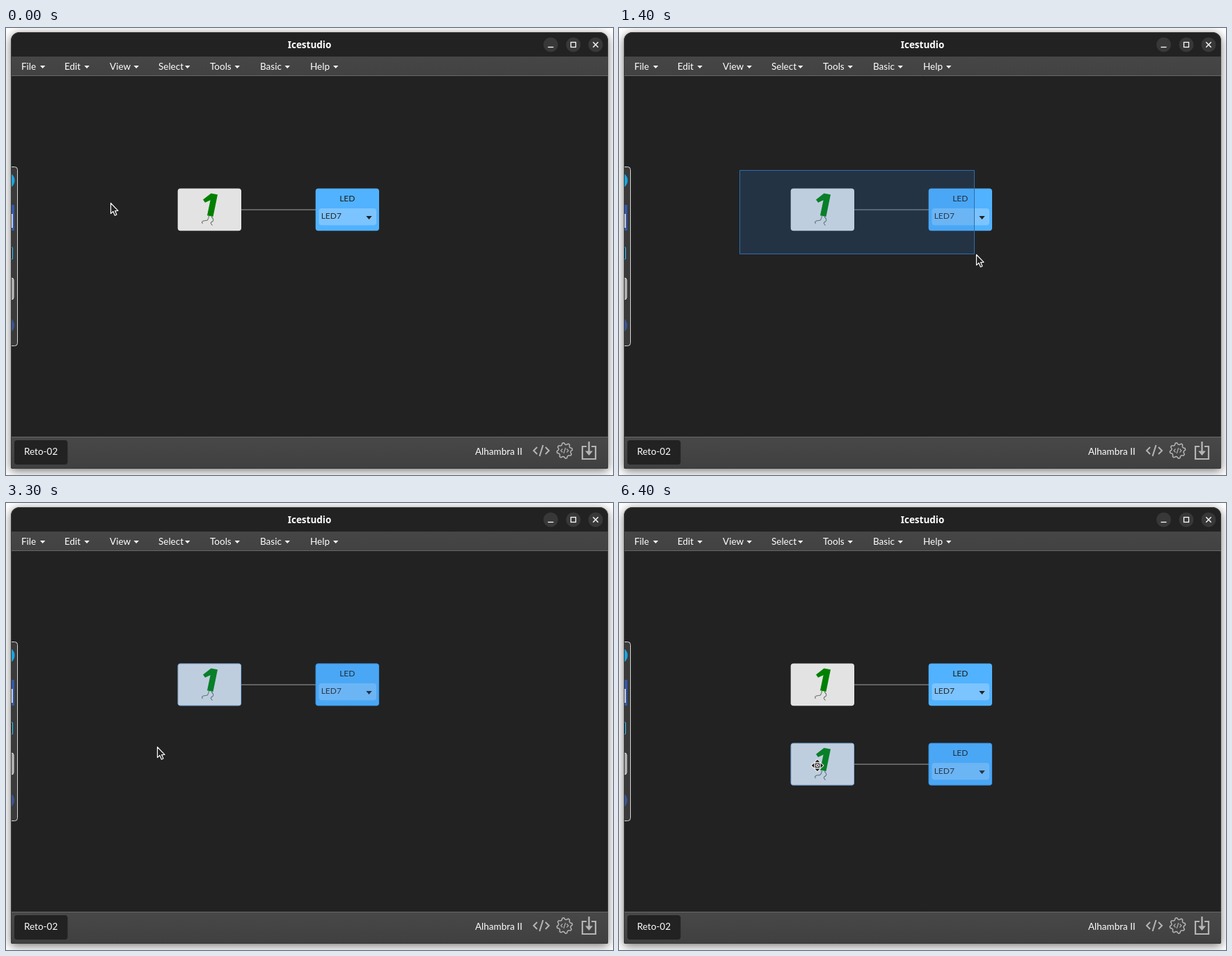
Animation of 872 by 642 pixels, one loop 8 s. Source, as an HTML page with a canvas:

```html
<!DOCTYPE html>
<html lang="en">
<head>
<meta charset="utf-8">
<title>Icestudio</title>
<style>
html, body { margin: 0; width: 100%; height: 100%; overflow: hidden; background: #fff; }
canvas { display: block; }
</style>
</head>
<body>
<canvas id="stage" width="872" height="642"></canvas>
<script>
const ctx = document.getElementById('stage').getContext('2d');
const LOOP = 8000, STEP = 100, GRID = 7.62;
const TINT = 'rgba(48,123,203,.2)';

const easeOut = p => 1 - Math.pow(1 - p, 1.4);
const smooth = p => p * p * (3 - 2 * p);
const linear = p => p;

// Pointer legs: first step, last step, destination, easing
const legs = [
  [100, 400, 173, 203, smooth],
  [600, 1400, 513, 325, easeOut],
  [1500, 1800, 565, 336, easeOut],
  [2200, 2200, 514, 341, linear],
  [2300, 2400, 396, 314, linear],
  [2600, 3300, 217, 350, smooth],
  [5200, 5200, 224, 355, linear],
  [5300, 5500, 254, 384, smooth],
  [5600, 5900, 285, 384, linear],
  [6100, 6100, 290, 383, linear],
  [6300, 6400, 285, 377, linear]
];

function pointerAt(t) {
  let x = 150, y = 251;
  for (const [first, last, tx, ty, ease] of legs) {
    const start = first - STEP;
    if (t <= start) break;
    const k = ease(Math.min(1, (t - start) / (last - start)));
    x += (tx - x) * k;
    y += (ty - y) * k;
  }
  return [x, y];
}

function box(x, y, w, h, r, fill, stroke) {
  ctx.beginPath();
  ctx.roundRect(x, y, w, h, r);
  if (fill) { ctx.fillStyle = fill; ctx.fill(); }
  if (stroke) { ctx.strokeStyle = stroke; ctx.lineWidth = 1; ctx.stroke(); }
}

function path(pts, close) {
  ctx.beginPath();
  pts.forEach(([x, y]) => ctx.lineTo(x, y));
  if (close) ctx.closePath();
}

function poly(pts, fill) {
  path(pts, true);
  ctx.fillStyle = fill;
  ctx.fill();
}

function line(pts, color, width, close) {
  path(pts, close);
  ctx.strokeStyle = color;
  ctx.lineWidth = width;
  ctx.stroke();
}

function disc(x, y, r, fill) {
  ctx.beginPath();
  ctx.arc(x, y, r, 0, Math.PI * 2);
  ctx.fillStyle = fill;
  ctx.fill();
}

function text(s, x, y, size, color, align = 'left', font = 'Lato') {
  ctx.font = `${size} ${font}, sans-serif`;
  ctx.textAlign = align;
  ctx.fillStyle = color;
  ctx.fillText(s, x, y);
}

const caret = (x, y, w, h, color) => poly([[x, y], [x + w, y], [x + w / 2, y + h]], color);

function bar(y, h, top, bottom) {
  const g = ctx.createLinearGradient(0, y, 0, y + h);
  g.addColorStop(0, top);
  g.addColorStop(1, bottom);
  ctx.fillStyle = g;
  ctx.fillRect(8, y, 857, h);
}

function drawWindow() {
  ctx.fillStyle = '#fff';
  ctx.fillRect(0, 0, 872, 642);
  ctx.save();
  ctx.shadowColor = 'rgba(0,0,0,.55)';
  ctx.shadowBlur = 14;
  ctx.shadowOffsetY = 3;
  box(7, 6, 858, 627, [12, 12, 2, 2], '#222');
  ctx.restore();
  box(7.5, 6.5, 857, 626, [12, 12, 2, 2], null, '#383838');

  text('Icestudio', 436, 29, 'bold 13.5px', '#fff', 'center', '"Noto Sans"');
  for (const x of [782.5, 815, 847]) disc(x, 24, 10.5, '#383838');
  line([[778.5, 27.5], [786.5, 27.5]], '#fff', 1.3);
  ctx.strokeRect(811.5, 20.5, 7, 7);
  line([[843.3, 20.3], [850.7, 27.7]], '#fff', 1.4);
  line([[850.7, 20.3], [843.3, 27.7]], '#fff', 1.4);

  bar(41, 27, '#464646', '#424242');
  line([[8, 68.5], [865, 68.5]], '#686868', 1);
  const menu = { File: [22, 49], Edit: [84, 112.5], View: [149, 183.5], Select: [219, 257],
                 Tools: [293, 328.5], Basic: [365, 400.5], Help: [437, 470] };
  for (const [name, [x, cx]] of Object.entries(menu)) {
    text(name, x, 60, '13.5px', '#fff');
    caret(cx, 54, 7.4, 4, '#fff');
  }
}

function drawPanel() {
  ctx.save();
  ctx.beginPath();
  ctx.rect(8, 190, 12, 280);
  ctx.clip();
  box(0, 199.5, 16.5, 257, 4, '#3a3a3a', '#d8d8d8');
  ctx.beginPath();
  ctx.rect(8, 200, 5, 256);
  ctx.clip();
  disc(1, 219, 11.5, '#1ba5e0');
  ctx.fillStyle = '#3558a8';
  ctx.fillRect(8, 254, 4, 37);
  ctx.fillStyle = '#fff';
  ctx.fillRect(8, 267, 1.5, 20);
  box(0, 315, 9.5, 17, 1, '#163a4c', '#4ac4f0');
  box(0, 359, 11, 31, 3, '#a8a8a8', '#ddd');
  disc(0, 427, 12, '#3c5590');
  ctx.restore();
}

function drawStatus() {
  const ink = '#b4b4b4';
  bar(587, 45, '#484848', '#404040');
  line([[8, 587.5], [865, 587.5]], '#6a6a6a', 1);
  box(12, 592, 76.5, 35, 4, '#222');
  text('Reto-02', 26, 613, '13.5px', '#fff');
  text('Alhambra II', 674, 613, '13.5px', '#fff');

  const code = (x, y, s, w) => {
    for (const d of [-1, 1])
      line([[x + 6 * d * s, y - 5 * s], [x + 11 * d * s, y], [x + 6 * d * s, y + 5 * s]], ink, w);
    line([[x + 2.5 * s, y - 8 * s], [x - 2.5 * s, y + 8 * s]], ink, w);
  };
  code(769, 607, 1, 2);
  code(802.5, 607, .5, 1.1);

  const gear = [];
  for (let i = 0; i < 32; i++) {
    const a = (i + .5) * Math.PI / 16, r = i % 4 > 1 ? 11.2 : 8.9;
    gear.push([802.5 + r * Math.cos(a), 607 + r * Math.sin(a)]);
  }
  ctx.lineJoin = 'round';
  line(gear, ink, 1.5, true);
  ctx.lineJoin = 'miter';

  line([[834, 601], [828, 601], [828, 619], [847, 619], [847, 601], [841, 601]], ink, 2.2);
  line([[837.5, 594], [837.5, 610]], ink, 2.4);
  poly([[832, 607.5], [843, 607.5], [837.5, 614]], ink);
}

function drawOne() {
  poly([[294.5, 237.5], [304, 239.3], [297.5, 271], [289, 269.2], [293.6, 247.3],
        [286, 250.8], [283, 246.5]], '#008000');
  ctx.beginPath();
  ctx.moveTo(291.5, 270);
  ctx.quadraticCurveTo(290.5, 277, 287, 276.5);
  ctx.quadraticCurveTo(283, 276.5, 281.5, 278.5);
  ctx.lineTo(282.3, 281);
  ctx.moveTo(295, 271);
  ctx.quadraticCurveTo(299.5, 275.5, 297, 277.5);
  ctx.quadraticCurveTo(293.5, 279.5, 294.5, 281);
  ctx.lineTo(296.5, 283.5);
  ctx.strokeStyle = '#66756a';
  ctx.lineWidth = 1.1;
  ctx.stroke();
}

function drawCircuit(dx, dy, selected) {
  ctx.save();
  ctx.translate(dx, dy);
  line([[337, 261], [446, 261]], '#777', 1.6);
  box(246.7, 230.4, 91.3, 60.8, 4, '#e3e3e3');
  drawOne();
  box(444.7, 230.4, 91.3, 60.8, 4, '#51b2ff');
  text('LED', 490.3, 248.5, '12px', '#1c1c1c', 'center');
  box(449.5, 259, 82.5, 24.3, 4, '#7cc4ff');
  text('LED7', 452.7, 274.3, '12px', '#2b2b2b');
  caret(517.3, 270, 8.4, 5, '#222');
  if (selected) {
    ctx.setLineDash([1, 1]);
    for (const x of [247, 445]) box(x, 230.8, 90.7, 60, 3, TINT, '#2b78c8');
  }
  ctx.restore();
}

function drawArrow(x, y) {
  ctx.save();
  ctx.translate(x, y);
  ctx.lineJoin = 'round';
  const shape = [[.5, .5], [.5, 15.6], [3.9, 12.5], [6.4, 18.2], [9, 17], [6.6, 11.6], [11, 11.3]];
  poly(shape, '#222');
  line(shape, '#fff', 1.2, true);
  ctx.restore();
}

function drawMove(x, y) {
  ctx.save();
  ctx.translate(x, y);
  ctx.lineJoin = 'round';
  for (let i = 0; i < 4; i++) {
    const head = [[0, -8.5], [3.6, -4.4], [-3.6, -4.4]];
    line(head, '#fff', 1.8, true);
    poly(head, '#222');
    ctx.rotate(Math.PI / 2);
  }
  box(-3.8, -3.8, 7.6, 7.6, 1.5, '#222', '#fff');
  disc(0, 0, 2.3, '#fff');
  disc(0, 0, 1.1, '#222');
  ctx.restore();
}

function drawLasso(t) {
  const [x, y] = pointerAt(Math.min(t, 1800) - 26);
  const x0 = 173.5, y0 = 204.5;
  box(x0, y0, Math.max(1, Math.round(x - x0)), Math.max(1, Math.round(y - y0)), 0, TINT, '#2e6ead');
}

// Grid cells of the pasted circuit relative to the first one
function pasteCells(t) {
  let cx = Math.min(0, Math.max(-4, (t - 5900) / STEP));
  if (t >= 6100 && t < 6400) cx = 1;
  return [cx, t < 6300 ? 16 : 15];
}

function render(now) {
  const t = Math.floor((now % LOOP) / STEP) * STEP;
  drawWindow();
  drawPanel();
  drawStatus();
  drawCircuit(0, 0, t >= 2200 && t < 4900);
  if (t >= 4900) {
    const [cx, cy] = pasteCells(t);
    drawCircuit(cx * GRID, cy * GRID, true);
  }
  if (t >= 600 && t < 2200) drawLasso(t);
  (t < 5200 ? drawArrow : drawMove)(...pointerAt(t));
}

const begin = performance.now();
function tick() {
  render(performance.now() - begin);
  requestAnimationFrame(tick);
}
tick();
</script>
</body>
</html>
```
